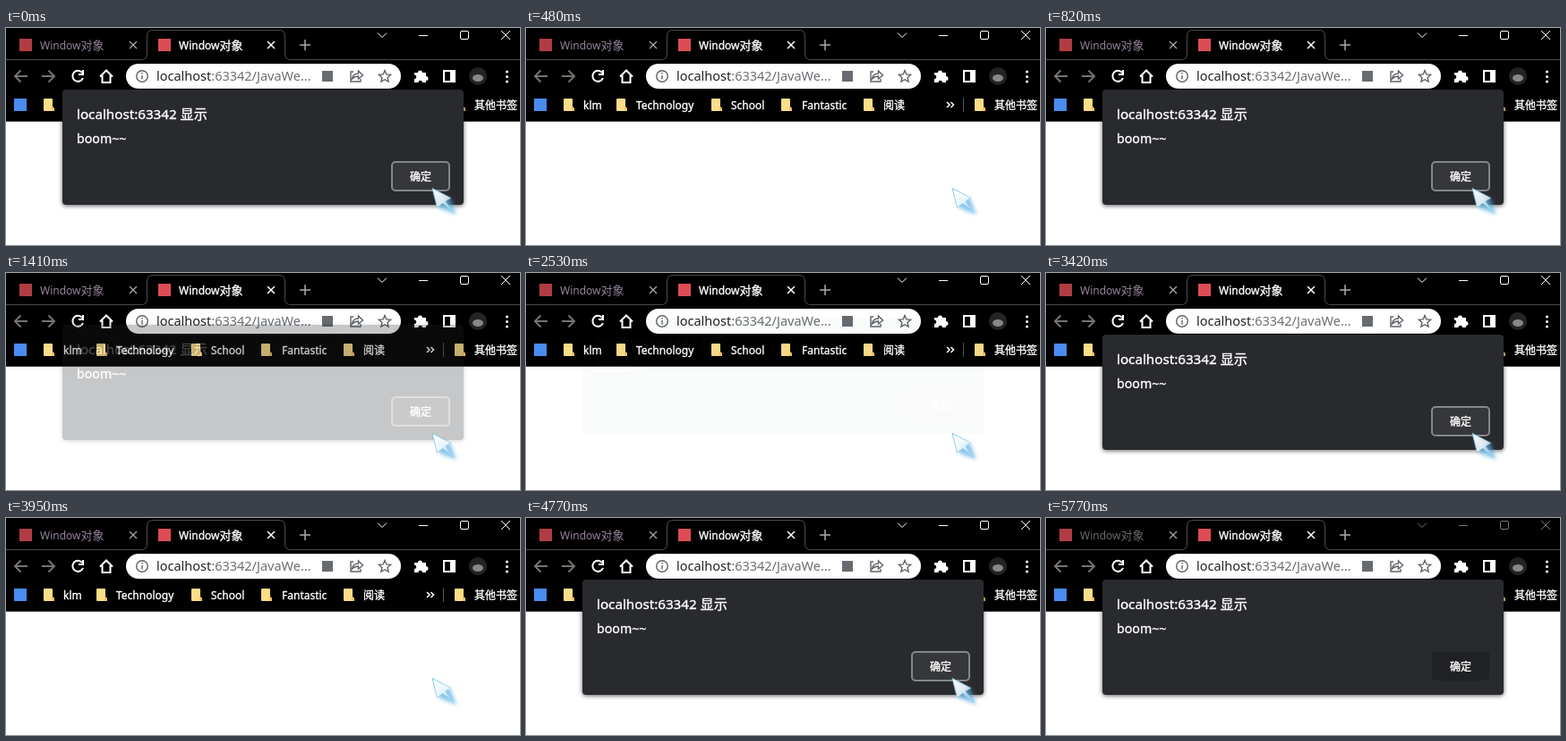
An HTML page for the animation above (5.9 s loop, 574x243 px).

```html
<!DOCTYPE html>
<html lang="zh">
<head>
<meta charset="utf-8">
<style>
  html, body { margin: 0; width: 100%; height: 100%; overflow: hidden; background: #fff; }
  svg { display: block; }
  text { font: 12px "Noto Sans", "Noto Sans CJK SC", "Noto Sans CJK", sans-serif; fill: #fff; white-space: pre; }
  .strong { stroke: #fff; stroke-width: .35; }
  .line { fill: none; stroke: #fff; stroke-width: 1.2; }
  .bold { stroke-width: 2; }
  .grey { stroke: #5f6368; stroke-width: 1.4; }
  .dim { stroke: #77736f; }
  #idle { fill: #93829a; }
  #panel { filter: drop-shadow(0 1.5px 2.5px rgba(0, 0, 0, .65)); }
  .inactive #idle { fill: #6d6668; }
  .inactive #controls { stroke: #777; }
  .inactive #button { stroke: none; }
</style>
</head>
<body>
<svg id="stage" width="574" height="243" viewBox="0 0 574 243">
  <defs>
    <filter id="soft" x="-50%" y="-50%" width="200%" height="200%"><feGaussianBlur stdDeviation="2"/></filter>
    <linearGradient id="ice" x1="0" y1="0" x2="1" y2="1">
      <stop offset="0" stop-color="#fff"/>
      <stop offset=".5" stop-color="#f6fcff" stop-opacity=".85"/>
      <stop offset="1" stop-color="#b8e0f5" stop-opacity=".1"/>
    </linearGradient>
    <linearGradient id="rim" x1="0" y1="0" x2="1" y2="1">
      <stop offset="0" stop-color="#7cc3e4"/>
      <stop offset="1" stop-color="#7cc3e4" stop-opacity=".25"/>
    </linearGradient>
    <g id="folder">
      <path d="M0 1Q0 0 1 0H9Q10 0 10 1V9L12 11V14H1Q0 14 0 13Z" fill="#fddd88"/>
      <path d="M9 9L12 11V14H9Z" fill="#f0c660"/>
    </g>
  </defs>

  <rect width="574" height="105"/>
  <path class="line" style="stroke:#3c3c3c;stroke-width:1" d="M0 104.500H574"/>

  <!-- tab strip -->
  <path class="line" style="stroke:#4b4b4b;stroke-width:1" d="M0 35.500H151Q157.500 35.500 157.500 29V9Q157.500 2.500 164 2.500H305Q311.500 2.500 311.500 9V29Q311.500 35.500 318 35.500H574"/>
  <rect x="15" y="12" width="14" height="14" fill="#dc4c55" opacity=".8"/>
  <rect x="170" y="12" width="14" height="14" fill="#dc4c55"/>
  <text id="idle" x="38" y="24">Window<tspan font-size="13">对象</tspan></text>
  <text class="strong" x="193" y="24">Window<tspan font-size="13">对象</tspan></text>
  <path class="line" style="stroke:#aaa" d="M138 15l8 8m0-8l-8 8"/>
  <path class="line" style="stroke-width:1.500" d="M292 15l8 8m0-8l-8 8"/>
  <path class="line" style="stroke:#aaa;stroke-width:1.500" d="M328 19h12m-6-6v12"/>
  <g id="controls" stroke="#fff" fill="none">
    <path d="M415 5.500l5 5l5-5M461 8.500h10M553 3l10 10m0-10l-10 10"/>
    <rect x="507.500" y="3.500" width="9" height="9" rx="1.500"/>
  </g>

  <!-- toolbar -->
  <path class="line bold dim" d="M24 54H10m6.500-6.500L10 54l6.500 6.500M40 54h14m-6.500-6.500L54 54l-6.500 6.500"/>
  <path class="line bold" d="M85 50A6 6 0 1 0 86 56M86 47v5h-5"/>
  <path class="line bold" d="M105 54.500l7-7l7 7M107.500 53v8h9v-8"/>
  <rect x="134" y="40" width="307" height="28" rx="14" fill="#fff"/>
  <circle class="line grey" cx="152" cy="54" r="6.300"/>
  <path class="line grey" d="M152 53v4.500M152 50v1.500"/>
  <text x="168" y="59" style="font-size:14.500px;fill:#202124">localhost<tspan fill="#6b6f73">:63342/JavaWe...</tspan></text>
  <rect x="353" y="48" width="12" height="12" fill="#676b70"/>
  <path class="line grey" d="M388 49h-3v11h11v-3M386.500 57q1-6 7-6v-3l5 5l-5 4v-3q-4 0-7 3Z"/>
  <path class="line grey" id="star"/>
  <path fill="#fff" d="M456 50h4a2.500 2.500 0 1 1 5 0h4v4a2.500 2.500 0 1 1 0 5v2h-4a2.300 2.300 0 0 0-4.600 0H456v-4a2.300 2.300 0 0 0 0-4.600Z"/>
  <path class="line bold" d="M489 48h12v12h-12Z"/>
  <rect x="496" y="48" width="5" height="12" fill="#fff"/>
  <circle cx="527" cy="54" r="10" fill="#242424"/>
  <ellipse cx="527" cy="56" rx="6" ry="4" fill="#888"/>
  <g fill="#fff"><circle cx="559.500" cy="49" r="1.500"/><circle cx="559.500" cy="54.500" r="1.500"/><circle cx="559.500" cy="60" r="1.500"/></g>

  <!-- bookmarks -->
  <rect x="9" y="79" width="14" height="14" fill="#4a8df0"/>
  <g id="bookmarks"></g>
  <path class="line bold" style="stroke-width:1.500" d="M470 83l3 3l-3 3m4.500-6l3 3l-3 3"/>
  <path class="line" style="stroke:#555;stroke-width:1" d="M488.500 78v16"/>

  <g id="dialog">
    <rect id="panel" x="63" y="69" width="448" height="129" rx="4" fill="#292a2d"/>
    <text class="strong" x="79" y="102" style="font-size:15.200px">localhost:63342 显示</text>
    <text class="strong" x="79" y="129" style="font-size:14.200px">boom~~</text>
    <rect id="button" x="431" y="150" width="64" height="32" rx="4" stroke="#858688" stroke-width="2"/>
    <text class="strong" x="463" y="171" text-anchor="middle">确定</text>
  </g>

  <g id="cursor">
    <path d="M480 185L496 191L503 209L492 205L483 201Z" fill="#5aaee4" opacity=".7" filter="url(#soft)"/>
    <path d="M476 179.500L497 190.500L491 194L501 207L487.500 196.500L481.500 201Z" fill="url(#ice)" stroke="url(#rim)" stroke-linejoin="round"/>
  </g>
</svg>
<script>
const LOOP = 5900;
const OPENS = [560, 2530, 4580];
const CLOSES = [210, 1220, 3680];
const LEAVE = 5440, BLUR = 5770;
const $ = id => document.getElementById(id);

const marks = [[42, 64, "klm"], [101, 123, "Technology"], [207, 229, "School"],
  [285, 308, "Fantastic"], [377, 399, "阅读"], [501, 523, "其他书签"]];
$("bookmarks").innerHTML = marks.map(([icon, x, label]) =>
  `<use href="#folder" x="${icon}" y="79"/><text class="strong" x="${x}" y="91">${label}</text>`).join("");

const points = Array.from({ length: 10 }, (_, i) => {
  const a = (i / 5 - .5) * Math.PI, r = i % 2 ? 3.2 : 7;
  return `${423 + r * Math.cos(a)} ${54.5 + r * Math.sin(a)}`;
});
$("star").setAttribute("d", `M${points.join("L")}Z`);

function shown(t) {
  const opened = OPENS.filter(x => x <= t).pop() ?? -1000;
  const closed = CLOSES.filter(x => x <= t).pop() ?? -2000;
  return opened > closed
    ? Math.min(1, .1 + .3 * Math.floor((t - opened) / 63))
    : Math.max(0, .9 - .225 * Math.floor((t - closed) / 65));
}

function draw(t) {
  const p = shown(t);
  $("dialog").setAttribute("opacity", p ** 1.7);
  $("dialog").setAttribute("transform", `translate(0 ${-20 * (1 - p)})`);

  const step = t < LEAVE ? 0 : Math.floor((t - LEAVE) / 66) + 1;
  $("cursor").setAttribute("transform", `translate(${-2 * step} ${12 * step})`);
  $("button").setAttribute("fill", step > 1 ? "#202124" : "#36373a");
  $("stage").classList.toggle("inactive", t >= BLUR);
}

const start = performance.now();
function tick() {
  draw((performance.now() - start) % LOOP);
  requestAnimationFrame(tick);
}
tick();
</script>
</body>
</html>
```
